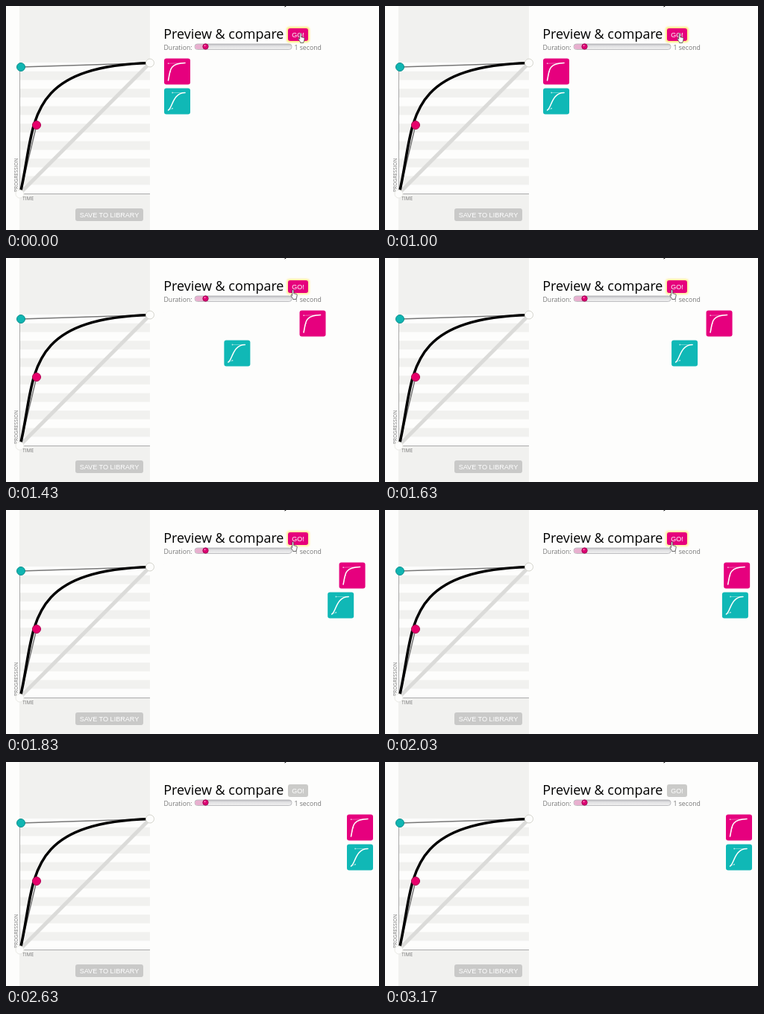
Write an HTML page that moves like this. It is 500 px wide and 301 px high and loops after 3.23 s.

```html
<!DOCTYPE html>
<html lang="en">
<head>
<meta charset="utf-8">
<title>Preview and compare</title>
<style>
  html, body { margin: 0; width: 100%; height: 100%; overflow: hidden; background: #fdfdfc; }
  svg { display: block; width: 100%; height: 100%; }
  text { font-family: "Open Sans", "Noto Sans", sans-serif; }
  .label { font-size: 8.7px; fill: #777; }
  .axis { font-size: 6.7px; fill: #777; }
  .button { font: 9.1px "Liberation Sans", sans-serif; fill: #fff; text-anchor: middle; }
</style>
</head>
<body>
<svg viewBox="0 0 500 301">
  <defs>
    <filter id="blur" x="-30%" y="-40%" width="160%" height="180%"><feGaussianBlur stdDeviation="1"/></filter>
    <linearGradient id="groove" x2="0" y2="1">
      <stop offset="0" stop-color="#bcbcc0"/>
      <stop offset=".4" stop-color="#e2e2e4"/>
      <stop offset="1" stop-color="#f0f0f0"/>
    </linearGradient>
  </defs>

  <rect x="18" width="175" height="301" fill="#f1f1ef"/>
  <g id="stripes" fill="#fdfdfc"></g>
  <path d="M19 251.500L192 77.500" stroke="#dbdbd9" stroke-width="5"/>
  <path d="M18.500 76V252.500H193" fill="none" stroke="#aaa" stroke-width="1"/>
  <text class="axis" transform="translate(15.500 250) rotate(-90)">PROGRESSION</text>
  <text class="axis" x="22" y="261">TIME</text>

  <path d="M41 160L19 252M20 82L193 76.500" stroke="#777" stroke-width="1.500"/>
  <path id="curve" fill="none" stroke="#000" stroke-width="3.600"/>
  <g stroke-width="1">
    <circle cx="18.500" cy="252.500" r="5.500" fill="#fdfdfc" stroke="#e9e9e4"/>
    <circle cx="193" cy="76.500" r="5.500" fill="#fdfdfc" stroke="#d4d4cc"/>
    <circle cx="41" cy="160" r="5.500" fill="#e8006c" stroke="#b00052"/>
    <circle cx="20" cy="82" r="5.500" fill="#10b5b2" stroke="#0d908d"/>
  </g>

  <rect x="93" y="272" width="91" height="17" rx="3" fill="#c9c9c8"/>
  <text class="button" x="138.500" y="284.300">SAVE TO LIBRARY</text>

  <path d="M375.500 0L373.500 1" stroke="#000"/>
  <text x="211.300" y="44" font-size="17.950">Preview &amp; compare</text>
  <text class="label" x="211.500" y="59">Duration:</text>
  <text class="label" x="386.500" y="59">1 second</text>
  <rect x="253" y="51" width="130" height="7.500" rx="3.500" fill="url(#groove)" stroke="#b0b0b4" stroke-width=".8"/>
  <rect x="253.500" y="51.500" width="14" height="6.500" rx="3" fill="#e8b0cf"/>
  <circle cx="267.500" cy="54.500" r="3.700" fill="#dc0072" stroke="#98004e" stroke-width=".8"/>
  <circle cx="266.600" cy="53.300" r="1" fill="#ff8fc4"/>

  <rect x="378" y="30" width="27" height="17" rx="3" fill="#cbcbc9"/>
  <g id="hot">
    <rect id="glow" x="376" y="28" width="31" height="21" rx="4" fill="#ffec80" filter="url(#blur)"/>
    <rect x="378" y="30" width="27" height="17" rx="3" fill="#e6007c"/>
  </g>
  <text class="button" x="391.500" y="41.700">GO!</text>

  <g id="boxes"></g>
  <g id="pointer" fill="#fff" stroke="#444" stroke-width=".8" stroke-linejoin="round">
    <path id="hand" d="M2.200 1.200a1 1 0 0 1 2 0v4l3.600 .8q1 .3 .9 1.300l-.5 3q-.2 1.200-.9 1.900v.8H3.200v-.8L.6 8.400q-.6-1 .2-1.300t1.400 .9z"/>
    <path id="arrow" d="M0 0v11l2.600-2.400 1.700 3.900 1.600-.7-1.700-3.800h3.500z"/>
  </g>
</svg>
<script>
const LOOP = 3230, FRAME = 100 / 3;
const START = 1219, DURATION = 1000, TRAVEL = 245;
const custom = [0.126, 0.52, 0.005, 0.97];
const ease = [0.25, 0.1, 0.25, 1];

const $ = id => document.getElementById(id);
const clamp = v => Math.min(1, Math.max(0, v));
const ramp = (t, from, to) => clamp((t - from) / (to - from));
const mix = (a, b, p) => a + (b - a) * p;

function bezier([x1, y1, x2, y2], x) {
  const at = (a, b, s) => 3 * (1 - s) * (1 - s) * s * a + 3 * (1 - s) * s * s * b + s * s * s;
  let lo = 0, hi = 1;
  for (let i = 0; i < 24; i++) {
    const mid = (lo + hi) / 2;
    if (at(x1, x2, mid) < x) lo = mid; else hi = mid;
  }
  return at(y1, y2, hi);
}

// Maps unit curve coordinates to a plot with its origin at the bottom left
const plot = (x, y, w, h) => (u, v) => `${(x + u * w).toFixed(2)} ${(y - v * h).toFixed(2)}`;
const curvePath = ([a, b, c, d], p) => `M${p(0, 0)}C${p(a, b)} ${p(c, d)} ${p(1, 1)}`;

function makeBox(curve, color, y) {
  const p = plot(5.5, 29.5, 22.5, 23.5), [a, b, c, d] = curve;
  const dot = (u, v) => `M${p(u, v)}h.01`;
  const g = document.createElementNS("http://www.w3.org/2000/svg", "g");
  g.innerHTML = `<rect width="35" height="35" rx="3" fill="${color}"/>
    <g fill="none" stroke="#fff" stroke-linecap="round">
      <path d="M${p(0, 0)}L${p(a, b)}M${p(c, d)}L${p(1, 1)}" stroke-width=".7" opacity=".5"/>
      <path d="${dot(a, b)}${dot(c, d)}" stroke-width="1.800" opacity=".6"/>
      <path d="${curvePath(curve, p)}" stroke-width="1.500"/>
    </g>`;
  $("boxes").append(g);
  return { g, curve, y };
}

const band = 176 / 15;
for (let i = 0; i < 15; i += 2) {
  $("stripes").innerHTML += `<rect x="18" y="${76 + i * band}" width="175" height="${band}"/>`;
}
$("curve").setAttribute("d", curvePath(custom, plot(19, 252, 174, 175.5)));
const boxes = [makeBox(custom, "#e6007e", 70.5), makeBox(ease, "#10b8b6", 110.5)];

function draw(time) {
  const t = Math.floor((time % LOOP + 4) / FRAME) * FRAME;
  const run = ramp(t, START, START + DURATION);
  for (const { g, curve, y } of boxes) {
    g.setAttribute("transform", `translate(${212 + TRAVEL * bezier(curve, run)} ${y})`);
  }

  const shift = ramp(t, 1200, 1330), leave = ramp(t, 2470, 2630);
  const x = mix(mix(391.5, 381.5, shift), 413, leave);
  const y = mix(mix(36.5, 42.5, shift), -20, leave);
  $("pointer").setAttribute("transform", `translate(${x} ${y})`);
  $("hand").style.display = y > 29 ? "" : "none";
  $("arrow").style.display = y > 29 ? "none" : "";

  $("hot").setAttribute("opacity", 1 - leave);
  $("glow").setAttribute("opacity", mix(1, 0.75, shift));
}

const begin = performance.now();
function tick(now) {
  draw(Math.max(0, now - begin));
  requestAnimationFrame(tick);
}
tick(begin);
</script>
</body>
</html>
```
